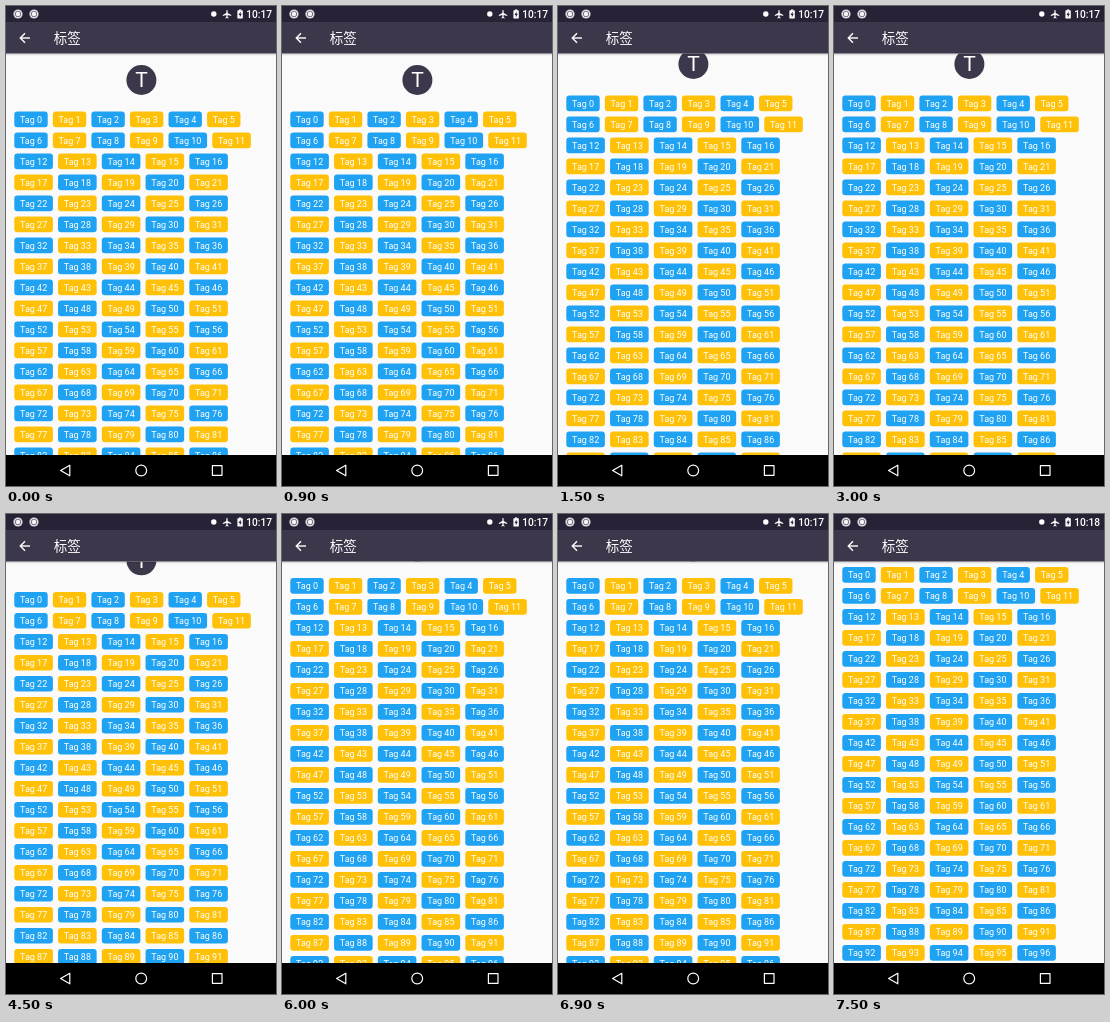
Recreate the animation shown at these times as an HTML page with a canvas. Size 270 px wide and 480 px high, loop 8000 ms.

```html
<!DOCTYPE html>
<html lang="zh-CN">
<head>
<meta charset="utf-8">
<title>标签</title>
<style>
  html, body { margin: 0; width: 100%; height: 100%; overflow: hidden; background: #fafafa; }
  canvas { display: block; width: 270px; height: 480px; }
</style>
</head>
<body>
<canvas id="stage"></canvas>
<script>
const W = 270, H = 480, LOOP = 8000, HOLD = 1500;
const BAR_BOTTOM = 47.5, NAV_TOP = 449;
const BLUE = '#20a2f2', YELLOW = '#ffc107', PURPLE = '#3d374b', STATUS = '#272236';
const SANS = 'Roboto, "Noto Sans", sans-serif';

// The list jumps to a new scroll position after every hold.
const scrolls = [0, 16, 16, 27.7, 41.5, 52.5];

const canvas = document.getElementById('stage');
const ctx = canvas.getContext('2d');
const ratio = window.devicePixelRatio || 1;
canvas.width = W * ratio;
canvas.height = H * ratio;
ctx.scale(ratio, ratio);

const tags = layoutTags(100);

// Tags wrap from left to right like words.
function layoutTags(count) {
  const left = 8.3, right = 246, gap = 5.15, rowStep = 21;
  const placed = [];
  let x = left, y = 105.6;
  for (let i = 0; i < count; i++) {
    const w = i < 10 ? 33.4 : 38.6;
    if (x + w > right || i === 6 || i === 12) {
      x = left;
      y += rowStep;
    }
    placed.push({ label: 'Tag ' + i, x, y, w, color: i % 2 ? YELLOW : BLUE });
    x += w + gap;
  }
  return placed;
}

function rect(x, y, w, h, color) {
  ctx.fillStyle = color;
  ctx.fillRect(x, y, w, h);
}

function disc(x, y, r, color) {
  ctx.fillStyle = color;
  ctx.beginPath();
  ctx.arc(x, y, r, 0, Math.PI * 2);
  ctx.fill();
}

function roundRect(x, y, w, h, r, color) {
  ctx.fillStyle = color;
  ctx.beginPath();
  ctx.moveTo(x + r, y);
  ctx.arcTo(x + w, y, x + w, y + h, r);
  ctx.arcTo(x + w, y + h, x, y + h, r);
  ctx.arcTo(x, y + h, x, y, r);
  ctx.arcTo(x, y, x + w, y, r);
  ctx.fill();
}

function polyline(points, close) {
  ctx.beginPath();
  points.forEach(([x, y], i) => i ? ctx.lineTo(x, y) : ctx.moveTo(x, y));
  if (close) ctx.closePath();
}

function text(str, x, y, font, align = 'left') {
  ctx.fillStyle = '#fff';
  ctx.font = font;
  ctx.textAlign = align;
  ctx.fillText(str, x, y);
}

function drawList(scroll) {
  ctx.save();
  ctx.beginPath();
  ctx.rect(0, BAR_BOTTOM, W, NAV_TOP - BAR_BOTTOM);
  ctx.clip();
  ctx.translate(0, -scroll);
  disc(135.4, 74, 15, PURPLE);
  text('T', 135.4, 81.4, '21px ' + SANS, 'center');
  for (const t of tags) {
    roundRect(t.x, t.y, t.w, 15.6, 3, t.color);
    text(t.label, t.x + t.w / 2, t.y + 11.1, '9px ' + SANS, 'center');
  }
  ctx.restore();
}

function drawStatus(clock) {
  rect(0, 0, W, 16, STATUS);
  for (const x of [12, 28]) {
    disc(x, 8, 4.6, '#dedde2');
    disc(x, 8, 3.1, '#77727f');
    disc(x, 8, 2.2, '#f4f4f6');
  }
  disc(207.8, 8, 2.7, '#fff');

  ctx.fillStyle = '#fff';
  polyline([
    [220.5, 4], [221.5, 4], [221.7, 7], [225.2, 9], [225.2, 10],
    [221.7, 9], [221.6, 11], [222.7, 11.9], [222.7, 12.6], [221, 12.1],
    [219.3, 12.6], [219.3, 11.9], [220.4, 11], [220.3, 9], [216.8, 10],
    [216.8, 9], [220.3, 7]
  ], true);
  ctx.fill();

  rect(233, 3.4, 2.2, 1.2, '#fff');
  roundRect(231.4, 4.2, 5.4, 8.4, 0.6, '#fff');
  ctx.fillStyle = STATUS;
  polyline([[234.6, 5.4], [232.5, 8.9], [233.8, 8.9], [233.8, 11.4], [235.8, 7.8], [234.6, 7.8]], true);
  ctx.fill();

  text(clock, 266, 11.9, '500 10.2px ' + SANS, 'right');
}

function drawToolbar() {
  const shade = ctx.createLinearGradient(0, BAR_BOTTOM, 0, BAR_BOTTOM + 2.5);
  shade.addColorStop(0, 'rgba(0,0,0,.18)');
  shade.addColorStop(1, 'rgba(0,0,0,0)');
  rect(0, BAR_BOTTOM, W, 2.5, shade);
  rect(0, 16, W, BAR_BOTTOM - 16, PURPLE);

  ctx.strokeStyle = '#fff';
  ctx.lineWidth = 1.4;
  polyline([[24, 32], [14.5, 32]]);
  ctx.stroke();
  polyline([[19, 27.3], [14.3, 32], [19, 36.7]]);
  ctx.stroke();
  text('标签', 47.8, 36.9, '13.5px "Noto Sans CJK SC", "Noto Sans CJK", sans-serif');
}

function drawNav() {
  rect(0, NAV_TOP, W, H - NAV_TOP, '#000');
  ctx.strokeStyle = '#fff';
  ctx.lineWidth = 1.2;
  ctx.lineJoin = 'round';
  polyline([[63.8, 459.2], [63.8, 469.8], [54.6, 464.5]], true);
  ctx.stroke();
  ctx.beginPath();
  ctx.arc(135.2, 464.5, 5.4, 0, Math.PI * 2);
  ctx.stroke();
  ctx.strokeRect(206.4, 459.7, 9.6, 9.6);
  ctx.lineJoin = 'miter';
}

function draw(now) {
  const step = Math.floor((now % LOOP) / HOLD);
  rect(0, 0, W, H, '#fafafa');
  drawList(scrolls[step]);
  drawToolbar();
  drawStatus(step < 5 ? '10:17' : '10:18');
  drawNav();
}

const start = performance.now();
function tick() {
  draw(performance.now() - start);
  requestAnimationFrame(tick);
}
tick();
</script>
</body>
</html>
```
